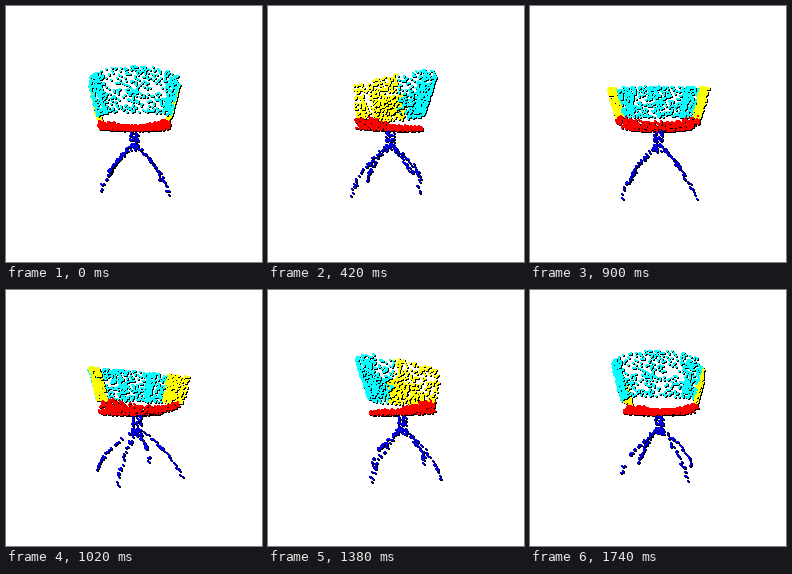
An HTML page with a canvas for the animation above (1800 ms loop, 256x256 px).

```html
<!DOCTYPE html>
<html lang="en">
<head>
<meta charset="utf-8">
<title>Rotating chair point cloud</title>
<style>
  html, body { margin: 0; width: 100%; height: 100%; overflow: hidden; background: #fff; }
  canvas { display: block; width: 256px; height: 256px; image-rendering: pixelated; }
</style>
</head>
<body>
<canvas id="stage" width="256" height="256"></canvas>
<script>
const SIZE = 256, STEP_MS = 60, STEPS = 30, CAMERA = 222;
const CYAN = [0, 255, 255], YELLOW = [255, 255, 0], RED = [255, 0, 0], BLUE = [0, 0, 225];
const BLACK = [0, 0, 0];

let seed = 20177;
function rnd() {
  seed = (seed + 0x6D2B79F5) | 0;
  let t = Math.imul(seed ^ (seed >>> 15), 1 | seed);
  t = (t + Math.imul(t ^ (t >>> 7), 61 | t)) ^ t;
  return ((t ^ (t >>> 14)) >>> 0) / 4294967296;
}
const spread = r => (rnd() * 2 - 1) * r;
const mix = (a, b, t) => a + (b - a) * t;

// Chair space: u towards the backrest, w sideways, z up.
const points = [];
const add = (u, w, z, color) => points.push({ u, w, z, color });

// Backrest and arms: one U-shaped shell, narrower at the bottom.
function addShell(count) {
  for (let i = 0; i < count; i++) {
    const q = spread(1), v = rnd(), side = Math.sign(q), p = Math.abs(q);
    const half = mix(36.5, 44, v), deep = mix(27, 39, v);
    let u, w;
    if (p < 0.68) {
      // The warp evens out the spacing along the superellipse.
      const t = p / 0.68, a = (t - 0.05 * Math.sin(4 * Math.PI * t)) * Math.PI / 2;
      u = deep * Math.cos(a) ** 0.83;
      w = half * Math.sin(a) ** 0.83;
    } else {
      u = -31 * (p - 0.68) / 0.32;
      w = half;
    }
    const back = (u + 31) / (deep + 31);
    const z = mix(mix(13, 19, back), mix(40, 56, back), v);
    add(u + spread(0.8), side * w + spread(0.8), z, u < 6 ? YELLOW : CYAN);
  }
}

// Seat: thin rounded cushion whose front corners curl up.
function addSeat(count) {
  for (let i = 0; i < count; i++) {
    const a = rnd() * Math.PI * 2, r = Math.sqrt(rnd());
    const c = Math.cos(a), s = Math.sin(a);
    const u = -6 + 32 * r * Math.sign(c) * Math.abs(c) ** 0.8;
    const front = Math.max(0, -u / 36);
    const w = (36 + 8 * front) * r * Math.sign(s) * Math.abs(s) ** 0.8;
    const e = (w / 38) ** 2;
    const z = 4.8 + 2 * e + front * (3 + 8 * e) + spread(1.7 + 1.4 * front);
    add(u, w, z, RED);
  }
}

function addBase() {
  const u0 = -6;
  for (let i = 0; i < 44; i++) {
    const a = rnd() * Math.PI * 2;
    add(u0 + 4 * Math.cos(a), 4 * Math.sin(a), mix(-17, 4, rnd()), BLUE);
  }
  for (let leg = 0; leg < 4; leg++) {
    const a = Math.PI / 4 + leg * Math.PI / 2;
    for (let i = 0; i < 36; i++) {
      const t = rnd() ** 1.3, k = 1 - t;
      const r = 2 * k * k + 80 * k * t + 43.5 * t * t + spread(1);
      const z = -11 * k * k - 70 * k * t - 55.5 * t * t + spread(1.6);
      const off = spread(1.8);
      add(u0 + r * Math.cos(a) - off * Math.sin(a), r * Math.sin(a) + off * Math.cos(a), z, BLUE);
    }
  }
}

addShell(1300);
addSeat(1000);
addBase();

const ctx = document.getElementById("stage").getContext("2d");
const image = ctx.createImageData(SIZE, SIZE);
const depth = new Float32Array(SIZE * SIZE);

function plot(x, y, near, color) {
  const i = y * SIZE + x;
  if (near <= depth[i]) return;
  depth[i] = near;
  image.data.set(color, i * 4);
}

// A small ball: 2x2 core, dark rim lying deeper so that dense areas stay pure.
function ball(x, y, near, color) {
  for (let dy = -1; dy <= 1; dy++) {
    for (let dx = -1; dx <= 1; dx++) {
      if (dx * dy < 0) continue;
      const core = dx < 1 && dy < 1;
      plot(x + dx, y + dy, core ? near : near - 16, core ? color : BLACK);
    }
  }
}

function draw(step) {
  const a = step / STEPS * Math.PI * 2, c = Math.cos(a), s = Math.sin(a);
  image.data.fill(255);
  depth.fill(-1e6);
  for (const p of points) {
    const near = p.u * c - p.w * s;
    const scale = CAMERA / (CAMERA - near);
    const x = 128 + (p.u * s + p.w * c) * scale;
    const y = 128 - p.z * scale;
    ball(Math.round(x), Math.round(y), near, p.color);
  }
  ctx.putImageData(image, 0, 0);
}

const start = performance.now();
let shown = -1;
function tick() {
  const step = Math.floor((performance.now() - start) / STEP_MS) % STEPS;
  if (step !== shown) draw(shown = step);
  requestAnimationFrame(tick);
}
tick();
</script>
</body>
</html>
```
